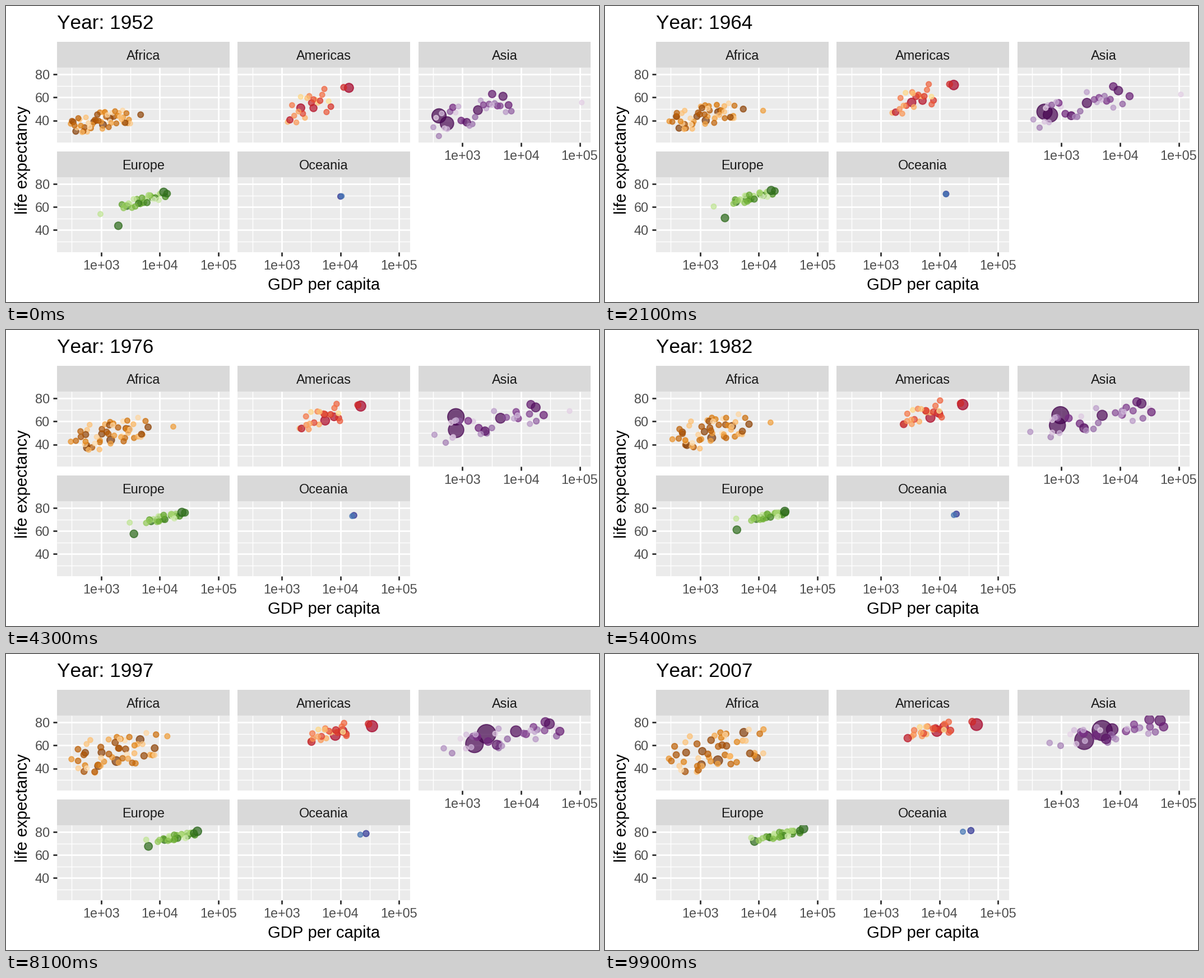
Write a matplotlib script that moves like this. It is 1058 px wide and 529 px high and loops after 10000 ms.

```python
import numpy as np
import matplotlib.pyplot as plt
from matplotlib.animation import FuncAnimation
from matplotlib.colors import LinearSegmentedColormap
from matplotlib.patches import Rectangle

W, H, DPI = 1058, 529, 128
PX = 72 / DPI                      # points per pixel
FRAMES, INTERVAL = 100, 100
YEARS = np.linspace(1952, 2007, FRAMES)
SURVEYS = np.arange(1952, 2008, 5)
TREND_YEARS = (1952, 1982, 2007)

PANEL_W, PANEL_H, STRIP_H = 307.7, 133.7, 46.2
LEFT, TOP, STEP_X, STEP_Y = 91, 110.4, 322.3, 195.6
X_MIN, X_SPAN = 2.2487, 2.94       # log10 of GDP
Y_MAX, Y_SPAN = 85.85, 65.1        # years of life
THICK, THIN, TICK = 2.85, 1.42, 7.3
BASE, SMALL, LARGE = 29.33, 23.47, 35.2

plt.rcParams["font.family"] = "Liberation Sans"
plt.rcParams["text.kerning_factor"] = 20   # unkerned text

# Dots are ranked by population: top millions in 2007, falling with decay.
# trend: log GDP, its spread, life, its spread at the trend years.
# link: how closely life follows GDP.
# leaders: rank -> millions and (year, GDP, life) stops of outstanding dots.
REGIONS = [
    dict(name="Africa", col=0, row=0, count=52, top=135, decay=.57, growth=3.9, link=.45,
         shades=["#7F3B08", "#B35806", "#E08214", "#FDB863", "#FEE0B6"],
         trend=[(2.99, .29, 39.5, 4.9), (3.18, .33, 51.5, 7.2), (3.24, .41, 55, 9.3)],
         leaders={
             0: (135, (1952, 1077, 36.3), (1982, 1577, 45.8), (2007, 2014, 46.9)),
             1: (80, (1952, 1419, 41.9), (1982, 3503, 56), (2007, 5581, 71.3)),
             4: (44, (1952, 4725, 45), (1992, 7711, 61.9), (2007, 9270, 49.3)),
             32: (6, (1952, 2388, 42.7), (1967, 18773, 50.2), (2007, 12057, 74)),
         }),
    dict(name="Americas", col=1, row=0, count=25, top=301, decay=1, growth=2.5, link=.55,
         shades=["#A50026", "#D73027", "#F46D43", "#FDAE61", "#FEE090"],
         trend=[(3.47, .21, 52.5, 7.5), (3.72, .2, 66, 5), (3.86, .21, 73.2, 3.4)],
         leaders={
             0: (301, (1952, 13990, 68.4), (1982, 25010, 74.7), (2007, 42952, 78.2)),
             1: (190, (1952, 2109, 50.9), (1982, 7031, 63.3), (2007, 9066, 72.4)),
             2: (109, (1952, 3478, 50.8), (1982, 9611, 67.4), (2007, 11978, 76.2)),
             5: (33, (1952, 11367, 68.8), (1982, 22899, 75.8), (2007, 36319, 80.7)),
         }),
    dict(name="Asia", col=2, row=0, count=33, top=1318, decay=1.1, growth=2.55, link=.7,
         shades=["#40004B", "#762A83", "#9970AB", "#C2A5CF", "#E7D4E8"],
         trend=[(3.17, .38, 46, 8.5), (3.58, .49, 62, 7), (3.85, .48, 71, 5.5)],
         leaders={
             0: (1318, (1952, 400, 44), (1962, 488, 44.5), (1972, 677, 63.1),
                 (1982, 962, 65.5), (2007, 4959, 73)),
             1: (1110, (1952, 547, 37.4), (1982, 856, 56.6), (2007, 2452, 64.7)),
             5: (127, (1952, 3217, 63), (1967, 9848, 71.4), (1982, 19384, 77.1),
                 (2007, 31656, 82.6)),
             31: (2.5, (1952, 108382, 55.6), (1972, 109348, 67.7), (1982, 31354, 71.3),
                  (2007, 47307, 77.6)),
         }),
    dict(name="Europe", col=0, row=1, count=30, top=100, decay=.62, growth=1.3, link=.85,
         shades=["#276419", "#4D9221", "#7FBC41", "#B8E186", "#E6F5D0"],
         trend=[(3.74, .22, 66, 4), (4.17, .17, 73, 2.1), (4.4, .19, 77.7, 2.4)],
         leaders={
             1: (71, (1952, 1969, 43.6), (1982, 4241, 61), (2007, 8458, 71.8)),
             23: (4.5, (1952, 974, 53.8), (1982, 4127, 70.7), (2007, 7446, 74.9)),
         }),
    dict(name="Oceania", col=1, row=1, count=2, top=20, decay=1.6, growth=2.3,
         shades=["#313695", "#4575B4"],
         leaders={
             0: (20.4, (1952, 10040, 69.1), (1982, 19477, 74.7), (2007, 34435, 81.2)),
             1: (4.1, (1952, 10557, 69.4), (1982, 17632, 73.8), (2007, 25185, 80.2)),
         }),
]


def to_x(log_gdp, left):
    return left + (log_gdp - X_MIN) / X_SPAN * PANEL_W


def to_y(life, top):
    return top + (Y_MAX - life) / Y_SPAN * PANEL_H


def corner(region):
    return LEFT + region["col"] * STEP_X, TOP + region["row"] * STEP_Y


def wander(rng, count):
    """Evenly spread scores, each on a random walk that turns at every survey."""
    start = rng.permutation(np.linspace(-1.75, 1.75, count))
    steps = rng.normal(0, .1, (count, len(SURVEYS)))
    steps[:, 0] = 0
    walks = start[:, None] + steps.cumsum(axis=1)
    return np.array([np.interp(YEARS, SURVEYS, walk) for walk in walks])


def cloud_tracks(region, count, rng):
    """Log GDP and life of the ordinary dots, each of shape (dots, frames)."""
    wealth, health = wander(rng, count), wander(rng, count)
    link = region["link"]
    health = link * wealth + np.sqrt(1 - link ** 2) * health
    gdp, gdp_spread, life, life_spread = (
        np.interp(YEARS, TREND_YEARS, values) for values in zip(*region["trend"]))
    return gdp + gdp_spread * wealth, life + life_spread * health


def leader_track(stops):
    years, gdp, life = zip(*stops)
    return np.interp(YEARS, years, np.log10(gdp)), np.interp(YEARS, years, life)


def region_dots(region, rng):
    """Pixel places (frames, dots, 2), marker areas (frames, dots) and colours."""
    count, leaders = region["count"], region["leaders"]
    others = [rank for rank in range(count) if rank not in leaders]
    gdp, life = np.zeros((2, count, FRAMES))
    people = region["top"] * np.exp(-region["decay"] * np.sqrt(np.arange(count)))
    if others:
        gdp[others], life[others] = cloud_tracks(region, len(others), rng)
    for rank, (millions, *stops) in leaders.items():
        people[rank] = millions
        gdp[rank], life[rank] = leader_track(stops)

    left, top = corner(region)
    places = np.stack([to_x(gdp.T, left), to_y(life.T, top)], axis=-1)
    millions = people * region["growth"] ** ((YEARS[:, None] - 2007) / 55)
    radius = 2.845 * (1 + 5 * np.sqrt(millions / 1318.7)) + .945
    areas = (2 * radius * PX) ** 2

    ramp = LinearSegmentedColormap.from_list(region["name"], region["shades"])
    colors = ramp(np.linspace(0, 1, count))
    colors[:, 3] = .7
    order = list(leaders) + [int(i) for i in rng.permutation(others)]
    return places[:, order], areas[:, order], colors[order]


fig = plt.figure(figsize=(W / DPI, H / DPI), dpi=DPI, facecolor="white")
ax = fig.add_axes([0, 0, 1, 1])
ax.set_xlim(0, W)
ax.set_ylim(H, 0)
ax.axis("off")


def box(x, y, w, h, color):
    return ax.add_patch(Rectangle((x, y), w, h, fc=color, ec="none", zorder=1))


def line(xs, ys, width, color="white"):
    ax.plot(xs, ys, color=color, lw=width * PX, solid_capstyle="butt", zorder=2)


def label(x, y, text, size, color="black", **kw):
    return ax.text(x, y, text, fontsize=size * PX, color=color, va="baseline", **kw)


def draw_panel(region):
    left, top = corner(region)
    right, bottom = left + PANEL_W, top + PANEL_H
    panel = box(left, top, PANEL_W, PANEL_H, "#EBEBEB")
    box(left, top - STRIP_H, PANEL_W, STRIP_H, "#D9D9D9")
    label(left + PANEL_W / 2, top - 14, region["name"], SMALL, "#1A1A1A", ha="center")

    for shift, width in ((.5, THIN), (0, THICK)):
        for v in (3, 4, 5):
            line([to_x(v - shift, left)] * 2, [top, bottom], width)
        for v in (40, 60, 80):
            line([left, right], [to_y(v - 20 * shift, top)] * 2, width)

    if region["row"] == 1 or region["col"] == 2:
        for v in (3, 4, 5):
            x = to_x(v, left)
            line([x, x], [bottom, bottom + TICK], THICK, "#333333")
            label(x, bottom + 31.2, f"1e+0{v}", SMALL, "#4D4D4D", ha="center")
    if region["col"] == 0:
        for v in (40, 60, 80):
            y = to_y(v, top)
            line([left - TICK, left], [y, y], THICK, "#333333")
            label(left - 13.2, y + 8.5, str(v), SMALL, "#4D4D4D", ha="right")
    return panel


clouds = []
for seed, region in enumerate(REGIONS):
    panel = draw_panel(region)
    places, areas, colors = region_dots(region, np.random.default_rng(seed))
    dots = ax.scatter(*places[0].T, s=areas[0], facecolors=colors, edgecolors=colors,
                      linewidths=1.89 * PX, zorder=3)
    dots.set_clip_path(panel)
    clouds.append((dots, places, areas))

title = label(LEFT, 41.4, "Year: 1952", LARGE)
label(567, 507.3, "GDP per capita", BASE, ha="center")
label(38, 275.5, "life expectancy", BASE, ha="center", rotation=90, rotation_mode="anchor")


def update(frame):
    title.set_text(f"Year: {round(YEARS[frame])}")
    for dots, places, areas in clouds:
        dots.set_offsets(places[frame])
        dots.set_sizes(areas[frame])
    return [title] + [dots for dots, _, _ in clouds]


anim = FuncAnimation(fig, update, frames=FRAMES, interval=INTERVAL, repeat=True)
plt.show()
```
